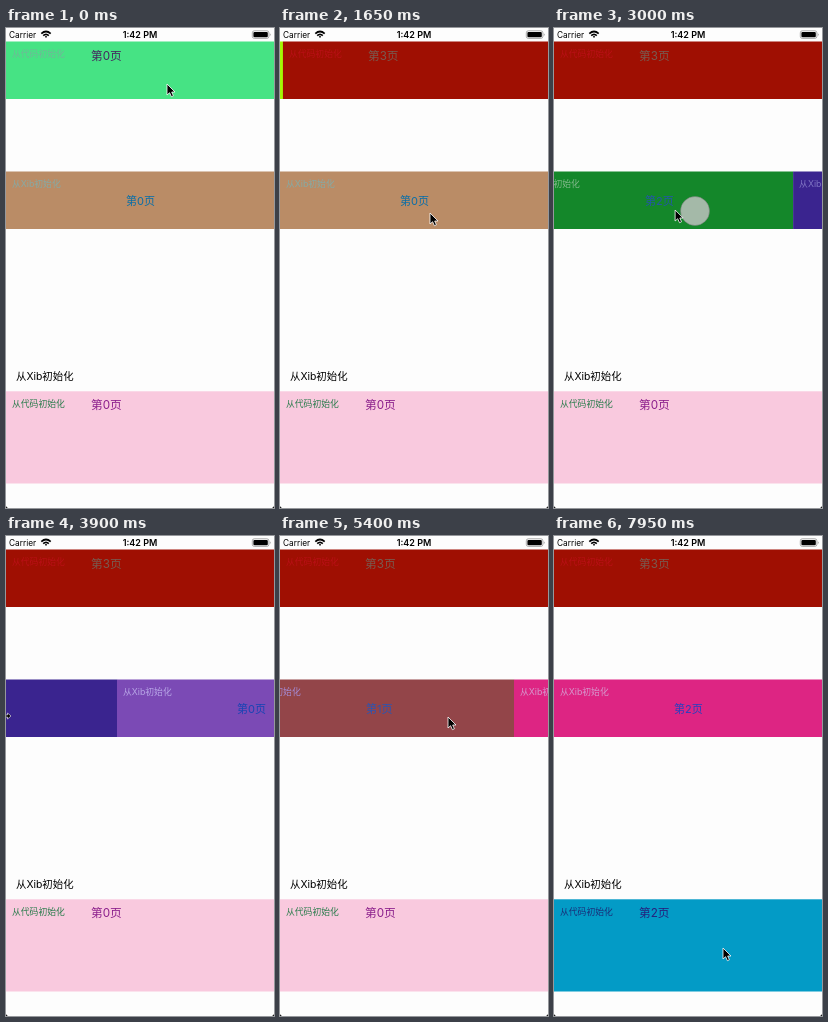
An HTML page for the animation above (8 s loop, 268x480 px).

```html
<!DOCTYPE html>
<html lang="zh-CN">
<head>
<meta charset="utf-8">
<style>
  html, body { margin: 0; width: 100%; height: 100%; overflow: hidden; background: #fdfdfd; }
  svg { display: block; width: 100vw; height: 100vh; }
  text { font-family: Inter, "Noto Sans CJK SC", "Noto Sans CJK", sans-serif; }
</style>
</head>
<body>
<svg id="stage" viewBox="0 0 268 480">
  <rect width="268" height="480" fill="#fdfdfd"/>
  <text x="3" y="9.7" font-size="8.3">Carrier</text>
  <g fill="none" stroke="#000" stroke-width="1.7">
    <path d="M35.3 5.6Q40 1.4 44.7 5.6M37.2 7.7Q40 5.2 42.8 7.7"/>
    <path d="M38.8 8.6L40 10L41.2 8.6Q40 7.6 38.8 8.6Z" fill="#000" stroke="none"/>
  </g>
  <text x="134" y="9.8" font-size="9" font-weight="600" text-anchor="middle">1:42 PM</text>
  <rect x="246.3" y="2.8" width="16.6" height="7.6" rx="2" fill="none" stroke="#888" stroke-width=".7"/>
  <rect x="247.4" y="3.9" width="14.4" height="5.4" rx="1.1"/>
  <path d="M263.9 5.2q1.6 1.4 0 2.8z" fill="#888"/>
  <g id="rows"></g>
  <text x="10" y="352.4" font-size="10.4">从Xib初始化</text>
  <path d="M0 478V480H2Q.5 479.5 0 478ZM268 478V480H266Q267.500 479.500 268 478Z"/>
  <circle id="touch" r="14.5" fill="#c4c4c4" fill-opacity=".82" stroke="#777" stroke-opacity=".6" stroke-width=".8"/>
  <path id="arrow" d="M0 0V11L2.600 8.700L4.400 12.700L6.400 11.800L4.700 8H8Z" stroke="#fff" stroke-width=".8"/>
  <path id="edge" d="M-3 -1H1.500V-3L5 0L1.500 3V1H-3Z" stroke="#fff" stroke-width=".6"/>
</svg>
<script>
const W = 268, LOOP = 8000, STEP = 150, DRAG = 225, SETTLE = 300;
const $ = id => document.getElementById(id);

// Each page: background, caption colour, number colour
const rows = [
  { y: 13.5, h: 57.5, caption: '从代码初始化', num: { x: 85, y: 18, size: 11.7 }, pages: [
    ['#46e384', '#70b897', '#45265f'], ['#4599a0', '#3c7fa5', '#27278c'],
    ['#a4f605', '#8a5a12', '#50701c'], ['#9f0f02', '#b91017', '#795b50']] },
  { y: 143.5, h: 57.5, caption: '从Xib初始化', num: { x: 120, y: 33, size: 11 }, pages: [
    ['#ba8c66', '#86aaa5', '#086ea9'], ['#20790f', '#5c9a50', '#2862bb'],
    ['#14872a', '#83b98c', '#2456a8'], ['#3a248f', '#8076c4', '#3b72cf'],
    ['#7b4ab5', '#b7a5e6', '#1744b4'], ['#934549', '#a58bd4', '#2a55b4'],
    ['#dd2583', '#d696cc', '#2740bf']] },
  { y: 363.3, h: 92.2, caption: '从代码初始化', num: { x: 85, y: 18, size: 11.7 }, pages: [
    ['#f9c9de', '#2a7c4c', '#8a1d8b'], ['#21d41f', '#277d32', '#40458b'],
    ['#039bc6', '#1a2f79', '#26207d']] }
];

// Swipes: row, start time, finger from x, to x, y
const swipes = [
  [0, 150, 161, 80, 60], [0, 675, 170, 89, 65], [0, 1200, 165, 85, 64],
  [1, 1650, 150, 60, 185], [1, 2215, 140, 0, 184.5], [1, 2950, 150, 20, 182],
  [1, 3675, 157, 0, 180], [1, 4400, 150, 30, 181], [1, 5175, 202, 168, 181],
  [2, 6850, 126, 40, 392], [2, 7400, 150, 60, 405]
];

const path = [[0, 161, 56]];
for (const [, t, a, b, y] of swipes) path.push([t, a, y], [t + DRAG, b, y]);
path.push([7950, 169, 412]);

function text(x, y, size, fill, str) {
  return `<text x="${x}" y="${y}" font-size="${size}" fill="${fill}">${str}</text>`;
}

$('rows').innerHTML = rows.map(r =>
  `<g transform="translate(0 ${r.y})"><g>` + r.pages.map(([bg, cap, num], i) =>
    `<g transform="translate(${i * W})"><rect width="${W + .1}" height="${r.h}" fill="${bg}"/>` +
    text(6, 15.6, 8.8, cap, r.caption) +
    text(r.num.x, r.num.y, r.num.size, num, `第${i % 4}页`) + '</g>').join('') +
  '</g></g>').join('');
const strips = [...$('rows').children].map(g => g.firstChild);

const clamp = v => Math.max(0, Math.min(1, v));
const move = (el, x, y) => el.setAttribute('transform', `translate(${x} ${y})`);

function cursorAt(t) {
  const i = Math.max(1, path.findIndex(p => p[0] >= t));
  const [t0, x0, y0] = path[i - 1], [t1, x1, y1] = path[i];
  const k = clamp((t - t0) / (t1 - t0));
  return [x0 + (x1 - x0) * k, y0 + (y1 - y0) * k];
}

function draw(now) {
  const t = Math.floor(now % LOOP / STEP) * STEP;
  const offset = [0, 0, 0];
  let touch = null;
  for (const [row, start, from, to, y] of swipes) {
    const p = clamp((t - start) / DRAG);
    const s = clamp((t - start - DRAG) / SETTLE);
    const dragged = (from - to) * p;
    offset[row] += dragged + (W - dragged) * (1 - (1 - s) ** 3);
    if (p > 0 && p < 1) touch = [from - dragged * Math.min(1, 1.4 * p), y + 1];
  }
  strips.forEach((g, i) => move(g, -offset[i], 0));

  const [x, y] = cursorAt(t);
  const atEdge = x < 2;
  move($('arrow'), x, y);
  move($('edge'), x, y);
  $('arrow').style.display = atEdge ? 'none' : '';
  $('edge').style.display = atEdge ? '' : 'none';
  $('touch').style.display = touch ? '' : 'none';
  if (touch) move($('touch'), ...touch);
  requestAnimationFrame(draw);
}
draw(performance.now());
</script>
</body>
</html>
```
